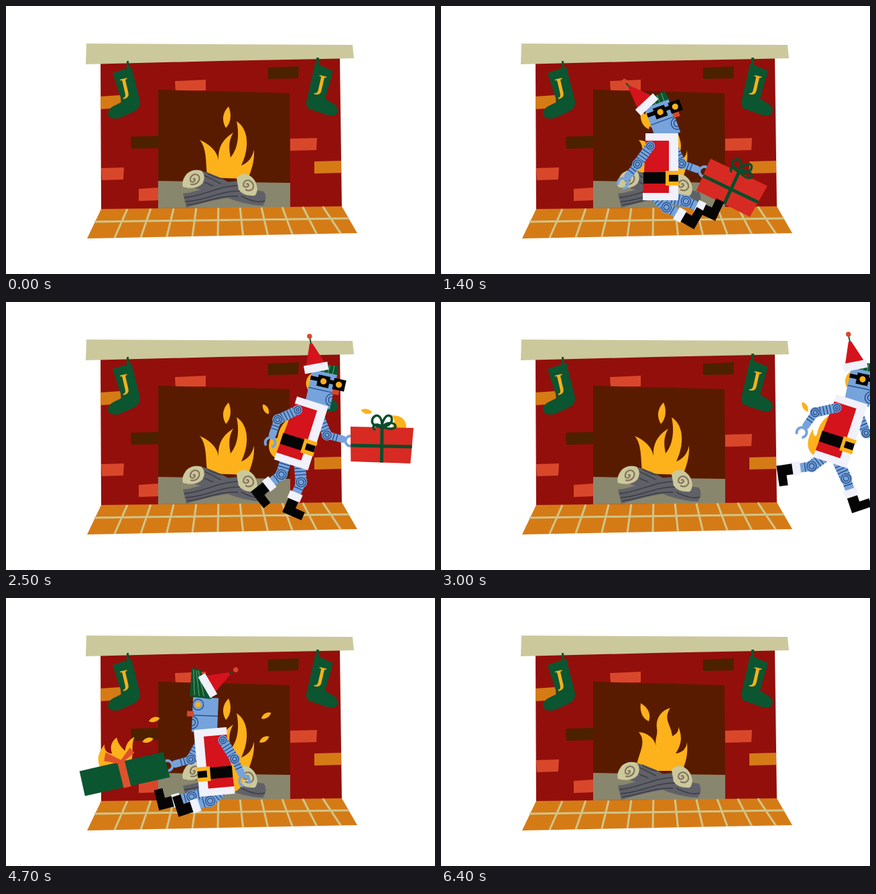
Recreate the animation shown at these times as an HTML page. Size 640x400 px, loop 6.5 s.

```html
<!DOCTYPE html>
<html lang="en">
<head>
<meta charset="utf-8">
<title>Fireplace robots</title>
<style>
  html, body { margin: 0; width: 100%; height: 100%; overflow: hidden; background: #fff; }
  svg { position: absolute; left: 0; top: 0; width: 640px; height: 400px; }
  .blue { fill: #76a3dc; }
  .line { fill: none; stroke: #1d4278; stroke-width: 1.2; }
  .fire { fill: #fdb11a; }
  .red { fill: #d4131c; }
  .white { fill: #f0f1fb; }
  .black { fill: #060505; }
  .green { fill: #0b5530; }
  .ember { fill: #d9472b; }
  .ochre { fill: #d57b16; }
  .umber { fill: #4c2100; }
  .cream { fill: #cbc89c; }
  .claw { fill: none; stroke: #76a3dc; stroke-width: 4; }
  .grain { fill: none; stroke: #3f4048; stroke-width: 1.8; }
  .ring { fill: none; stroke: #85745d; stroke-width: 2.2; }
  .letter { font: bold 31px "Noto Serif", serif; fill: #f4b01c; text-anchor: middle; }
  .pose-a { animation: show .5s step-end infinite; }
  .pose-b { animation: hide .5s step-end infinite; }
  @keyframes show { 0% { opacity: 1 } 60%, 100% { opacity: 0 } }
  @keyframes hide { 0% { opacity: 0 } 60%, 100% { opacity: 1 } }
</style>
</head>
<body>
<svg viewBox="0 0 640 400">
  <path fill="#930f0b" d="M141 80L498 76 501 301 142 304Z"/>
  <path class="ochre" d="M141 135L171 133 172 152 141 154ZM460 232L500 231 500 249 460 250Z"/>
  <path class="ember" d="M252 112L298 110 298 126 253 127ZM424 198L464 197 463 215 424 216ZM142 242L176 241 175 259 143 260ZM198 273L227 271 227 290 198 291Z"/>
  <path class="umber" d="M391 92L437 90 436 108 391 109ZM186 195L228 194 228 212 187 213Z"/>
  <path fill="#591b00" d="M227 125L423 130 424 301 227 302Z"/>
  <path fill="#89866e" d="M227 261L424 264 424 301 227 302Z"/>
  <path class="cream" d="M120 56L517 58 519 78 320 82 119 87Z"/>
  <path class="ochre" d="M142 303L501 299 524 339 121 347Z"/>
  <path id="grout" fill="none" stroke="#d0c588" stroke-width="3"/>

  <path class="green" d="M180 82L183 82 184 92 187 91 199 138Q203 150 192 157L170 167Q156 171 152 162 152 154 159 150L173 143 159 100 180 93Z"/>
  <path class="green" d="M463 77L467 77 467 88 488 97 476 138 490 147Q497 153 494 160 489 166 477 162L453 154Q447 150 448 143L461 86 463 86Z"/>
  <text class="letter" transform="translate(180 130) rotate(-13)">J</text>
  <text class="letter" transform="translate(468 126) rotate(13)">J</text>

  <g class="fire">
    <g class="pose-a">
      <path d="M301 256C297 238 301 214 289 200 306 207 315 218 317 230 316 209 325 198 339 189 331 203 333 214 335 226 347 212 348 190 344 172 363 184 363 214 351 238 362 234 368 225 370 214 371 232 366 245 361 258Z"/>
      <path d="M332 150C322 160 322 172 328 182 337 173 336 159 332 150Z"/>
    </g>
    <g class="pose-b">
      <path d="M292 258C289 238 310 218 295 200 308 201 318 209 321 221 318 211 324 206 322 194 320 180 328 168 342 164 331 181 343 188 345 206 352 203 355 198 354 192 361 208 358 220 350 232 360 231 366 225 367 215 369 236 364 247 360 258Z"/>
      <path d="M298 157C296 170 301 180 310 184 314 172 308 163 298 157Z"/>
    </g>
  </g>

  <path fill="#606168" d="M290 246Q318 252 342 270L385 277Q391 288 383 298 355 297 325 284L282 272Z"/>
  <path class="grain" d="M296 253Q320 264 345 280T386 291M296 263Q320 273 340 284M300 249Q310 256 322 258"/>
  <path fill="#606168" d="M264 280C290 277 318 263 346 261L372 282C336 283 304 291 269 301Z"/>
  <path class="grain" d="M266 286C294 284 320 267 350 268M268 292C298 291 322 274 356 276M270 297C296 294 320 282 346 284"/>
  <path class="cream" d="M264 270Q261 261 270 250 280 242 292 246 299 255 293 265 283 275 264 270ZM344 257Q350 248 362 252 374 259 375 273 374 285 367 283 353 283 347 274Z"/>
  <path class="ring" d="M279 259q3-3 3 1-3 5-7 1-1-8 7-10 8 1 6 9-4 8-13 6M358 266q4-2 4 2-4 5-8 0 0-8 8-8 8 3 7 11-4 7-12 3"/>
</svg>
<script>
const LOOP = 6500;

// Tile joints fan out towards the front of the hearth.
const tileJoint = (_, i) =>
  `M${181 + 35.2 * i - 0.31 * i * i} ${303 - 0.4 * i}L${162 + 39.3 * i - 0.2 * i * i} ${346 - 0.7 * i}`;
document.querySelector("#grout").setAttribute("d",
  "M132 322L512 317" + Array.from({ length: 10 }, tileJoint).join(""));

// Joint order: torso, head, near arm (2), far arm (2), present, near leg (2), far leg (2)
const POSES = {
  fall: [0, -5, 60, -20, -30, -50, 85, -5, 5, -10, 10],
  lean: [0, -20, 35, 3, -27, -43, 95, -45, -15, -78, 13],
  sit: [8, 0, 22, -13, -37, -48, 82, -58, -29, -88, -2],
  dash: [25, 0, 80, -55, -37, -44, 73, -7, 100, -119, 119],
  stride: [18, -6, 60, -43, -40, -54, 77, 35, 29, -43, 6],
  cross: [17, -4, 20, -50, -40, -50, 73, -70, 45, 20, 70]
};

const joint = (index, x, y, content) =>
  `<g data-joint="${index}" data-at="${x},${y}">${content}</g>`;

const spark = (x, y, turn) =>
  `<path class="fire" transform="translate(${x} ${y}) rotate(${turn})" d="M0 -8C5 -4 5 4 0 9 -5 4 -4 -4 0 -8Z"/>`;

function segment(length, width) {
  let stripes = "";
  for (let y = 5; y < length - 5; y += 5) stripes += `M${-width / 2} ${y}h${width}`;
  return `<rect class="blue" x="${-width / 2}" y="${-width / 2}" width="${width}" height="${length + width}" rx="${width / 2}"/>
    <path class="line" d="${stripes}"/>`;
}

const knob = (y, r) => `<circle class="blue" cy="${y}" r="${r}"/>
  <circle class="line" cy="${y}" r="${r - 2}"/><circle class="line" cy="${y}" r="${r - 5}"/>`;

function arm(first, x, y, held = "") {
  const hand = `<path class="claw" d="M-4 42A7.5 7.5 0 1 1 5 42"/>`;
  return joint(first, x, y, segment(33, 14) + knob(0, 7) +
    joint(first + 1, 0, 33, segment(24, 11) + hand + held) + knob(33, 8));
}

function leg(first, x, y) {
  const boot = `<path class="black" d="M-8 26H8V39H23V52H-8Z"/>
    <rect class="white" x="-10" y="17" width="20" height="12"/>`;
  return joint(first, x, y, segment(26, 17) +
    joint(first + 1, 0, 26, segment(16, 14) + boot) + knob(26, 9));
}

const redPresent = `
  <g class="burn"><path class="fire" d="M6 -22C22 -28 20 -38 14 -44 30 -46 38 -36 36 -22Z"/>${spark(-23, -50, 100)}</g>
  <path fill="#d72a22" d="M-47 -27L47 -26 43 27 -46 25Z"/>
  <path fill="none" stroke="#0a4c2b" stroke-width="5" d="M-46 1L45 2M0 -27V26"/>
  <path fill="none" stroke="#0a4c2b" stroke-width="3.5" d="M0 -27C-24 -27 -14 -48 -5 -43 0 -40 0 -32 0 -27 0 -36 6 -48 13 -43 18 -35 10 -28 0 -27 10 -37 21 -33 20 -27 16 -22 8 -24 0 -27 -9 -35 -18 -27 -10 -22"/>`;

const greenPresent = `
  <g class="burn"><path class="fire" d="M32 -16C37 -32 28 -42 19 -50 22 -41 17 -36 11 -34 12 -45 8 -52 -1 -56 -1 -46 -5 -39 -9 -34 -12 -43 -18 -49 -27 -51 -18 -38 -22 -28 -14 -16Z"/>
    ${spark(-62, -70, -87)}${spark(-46, -42, -87)}</g>
  <path class="green" d="M-64 -20L64 -19 64 19 -66 19Z"/>
  <path fill="#df512d" d="M-5 -20H6L5 20H-6ZM0 -17L-22 -28 -17 -37 0 -22 20 -38 25 -26 4 -17Z"/>`;

const hat = (x, y, turn) => `<g transform="translate(${x} ${y}) rotate(${turn})">
  <path d="M-1 -34V-47" stroke="#0b5530" stroke-width="2"/>
  <circle class="ember" cx="-1" cy="-48" r="3.7"/>
  <path class="red" d="M-15 -3L-3 -37H1L15 -3Z"/>
  <rect class="white" x="-18" y="-6" width="36" height="12"/></g>`;

const skull = `
  <rect class="blue" x="-19" y="-48" width="38" height="52"/>
  <path class="line" d="M-19 -21H19M19 -19A9 9 0 0 0 19 -1M19 -15A5 5 0 0 0 19 -5"/>
  <rect class="ember" x="17" y="-27" width="10" height="8"/>`;

const goggledHead = `
  <path class="fire" d="M-17 -44C-27 -36 -26 -22 -17 -16Z"/>
  <path class="green" d="M-12 -46V-57L18 -62 20 -46Z"/>
  <path stroke="#72a573" d="M-2 -47V-59M5 -47V-60M12 -47V-61"/>${skull}
  <path class="black" d="M-19 -39H-8V-43H10V-39H16V-43H34V-26H16V-33H10V-26H-8V-33H-19Z"/>
  <circle class="fire" cx="1" cy="-34.5" r="4.6"/><circle class="fire" cx="24.5" cy="-34.5" r="4.6"/>
  ${hat(-14, -52, -23)}`;

const bareHead = `${skull}
  <path class="green" d="M-8 -46L24 -49 23 -91 10 -90Z"/>
  <path stroke="#72a573" d="M3 -50L13 -88M10 -50L16 -88M17 -51L20 -89"/>
  <circle class="line" cx="11" cy="-37" r="8"/><circle class="fire" cx="11" cy="-37" r="4"/>
  ${hat(-2, -66, -57)}`;

const coat = `
  <path class="red" d="M-22 -96H18V-4H-27Z"/>
  <path class="white" d="M-23 -98H26V2H-27V-9H12V-87H-23Z"/>
  <rect class="black" x="-26" y="-40" width="52" height="17"/>
  <path class="fire" fill-rule="evenodd" d="M7 -42H27V-20H7ZM12 -36V-26H27V-36Z"/>`;

const tailFlame = sparks => `<g class="burn">
  <path class="fire" d="M-15 0C-38 2 -46 -16 -40 -38 -37 -29 -33 -26 -32 -32 -34 -46 -30 -56 -24 -64 -25 -50 -18 -44 -14 -40Z"/>${sparks}</g>`;

function robot({ head, present, reach, sparks, mirrored, track, ignite }) {
  const svg = document.createElementNS("http://www.w3.org/2000/svg", "svg");
  svg.setAttribute("viewBox", "0 0 640 400");
  const held = joint(6, 0, 36, `<g transform="translate(${reach})">${present}</g>`);
  svg.innerHTML = `<g ${mirrored ? 'transform="translate(640 0) scale(-1 1)"' : ""}>` +
    joint(0, 0, 0, tailFlame(sparks) + arm(4, 16, -82, held) + leg(9, 12, -2) + leg(7, -10, -6) +
      joint(1, 10, -97, head) + coat + arm(2, -16, -79)) + "</g>";
  document.body.append(svg);
  const joints = [...svg.querySelectorAll("[data-joint]")];
  const flames = svg.querySelectorAll(".burn");

  return time => {
    const next = track.findIndex(key => key[0] > time);
    svg.style.display = next > 0 ? "" : "none";
    if (next < 1) return;
    const [t0, x0, y0, from] = track[next - 1], [t1, x1, y1, to] = track[next];
    const part = (time - t0) / (t1 - t0);
    const mix = (a, b) => a + (b - a) * part;
    // Until it lands, the robot only shows inside the opening.
    svg.style.clipPath = time < track[1][0] ? "inset(127px 217px 0 227px)" : "none";
    for (const node of joints) {
      const i = +node.dataset.joint;
      const at = i ? node.dataset.at : `${mix(x0, x1)},${mix(y0, y1)}`;
      node.setAttribute("transform", `translate(${at}) rotate(${mix(POSES[from][i], POSES[to][i])})`);
    }
    for (const flame of flames) flame.style.display = time < ignite ? "none" : "";
  };
}

const robots = [
  robot({
    head: goggledHead, present: redPresent, reach: "47 5",
    sparks: spark(-62, -66, -48), ignite: 1700,
    track: [
      [1100, 328, 40, "fall"], [1300, 328, 288, "lean"], [1450, 328, 288, "lean"],
      [1900, 324, 295, "sit"], [2150, 324, 295, "sit"], [2400, 395, 240, "stride"],
      [2700, 488, 244, "cross"], [3000, 581, 238, "stride"], [3300, 674, 244, "cross"],
      [3600, 767, 238, "stride"]
    ]
  }),
  robot({
    head: bareHead, present: greenPresent, reach: "66 -2", mirrored: true,
    sparks: spark(-84, -110, -64) + spark(-78, -75, -64), ignite: 4700,
    track: [
      [4100, 328, 40, "fall"], [4300, 328, 288, "lean"], [4450, 328, 288, "lean"],
      [4850, 324, 295, "sit"], [5080, 324, 295, "sit"], [5400, 409, 284, "dash"],
      [5700, 502, 240, "stride"], [6000, 595, 244, "cross"], [6300, 688, 240, "stride"],
      [6380, 713, 240, "stride"]
    ]
  })
];

const start = performance.now();
function draw() {
  const time = (performance.now() - start) % LOOP;
  robots.forEach(update => update(time));
  requestAnimationFrame(draw);
}
draw();
</script>
</body>
</html>
```
